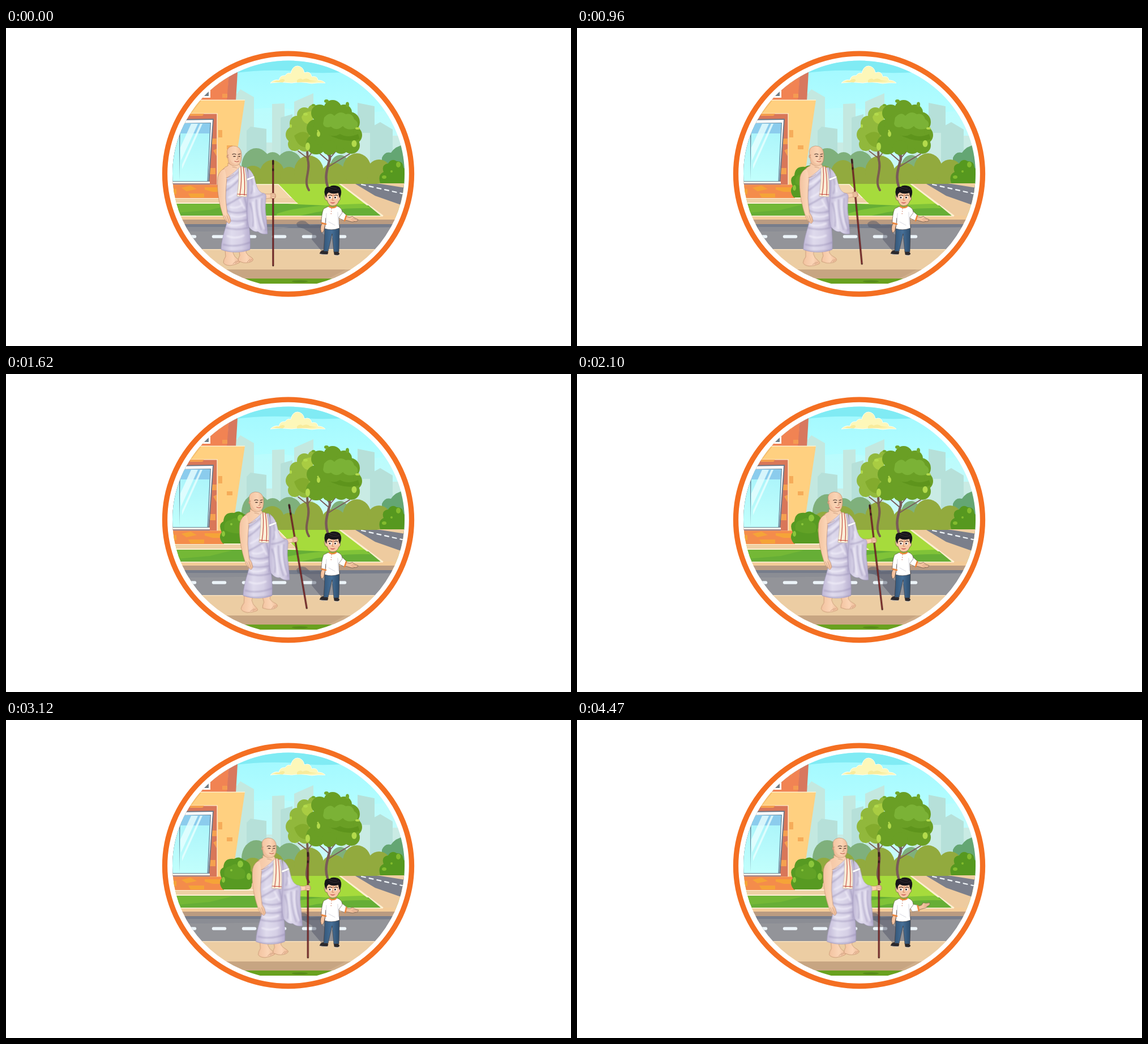
Animation of 998 by 561 pixels, one loop 4.5 s. Source, as an HTML page:

```html
<!DOCTYPE html>
<html lang="en">
<head>
<meta charset="utf-8">
<title>Walk and greet</title>
<style>
html, body { margin: 0; width: 100%; height: 100%; overflow: hidden; background: #fff; }
svg { display: block; width: 100vw; height: 100vh; }
.skin { fill: url(#skin); stroke: #a87352; stroke-width: .5; stroke-linejoin: round; }
.line { fill: none; stroke-linecap: round; stroke-linejoin: round; }
.fold { fill: none; stroke-linecap: round; filter: url(#soft); }
.boy { stroke: #3b2a22; stroke-width: .5; stroke-linejoin: round; }
</style>
</head>
<body>
<svg viewBox="0 0 998 561" preserveAspectRatio="none">
<defs>
  <clipPath id="view"><path d="M294 257.500A205 200 0 0 1 704 257.500A205 200 0 0 1 549 451H449A205 200 0 0 1 294 257.500Z"/></clipPath>
  <linearGradient id="sky" x2="0" y2="1">
    <stop offset="0" stop-color="#a0f8ff"/><stop offset=".4" stop-color="#b2fdff"/><stop offset="1" stop-color="#dcf8f4"/>
  </linearGradient>
  <linearGradient id="glass" x2="0" y2="1"><stop offset="0" stop-color="#a8f3fa"/><stop offset="1" stop-color="#c2fffc"/></linearGradient>
  <linearGradient id="skin"><stop offset="0" stop-color="#f3c3a0"/><stop offset=".6" stop-color="#fbd5b6"/><stop offset="1" stop-color="#f0bd99"/></linearGradient>
  <linearGradient id="robe"><stop offset="0" stop-color="#c0b8d6"/><stop offset=".35" stop-color="#dfdbed"/><stop offset=".7" stop-color="#d6d0e6"/><stop offset="1" stop-color="#b6adcf"/></linearGradient>
  <linearGradient id="jeans"><stop offset="0" stop-color="#34577a"/><stop offset=".5" stop-color="#466f97"/><stop offset="1" stop-color="#2c4c6c"/></linearGradient>
  <filter id="soft" x="-30%" y="-30%" width="160%" height="160%"><feGaussianBlur stdDeviation="1.2"/></filter>
  <clipPath id="robeClip"><path id="robeShape" d="M411 247C403 256 393 262 383 270C388 286 384 300 387 314C393 328 392 340 386 358C382 372 380 382 380 391C396 397 416 397 431 391C432 372 430 354 428 336C433 310 434 276 425 246Z"/></clipPath>
</defs>

<g clip-path="url(#view)">
  <!-- sky and skyline -->
  <path fill="url(#sky)" d="M280 50H720V290H280Z"/>
  <path fill="#80ebf4" d="M330 50H660V72Q560 84 515 76Q455 72 400 80L340 90Z"/>
  <path fill="#c3fbfc" opacity=".5" d="M400 155Q450 132 520 146T720 140V250H400Z"/>
  <path fill="#fdf7b9" stroke="#fffdf0" stroke-width="1" d="M467 97Q474 90 482 92Q484 83 493 84Q497 78 503 80Q506 67 515 67Q525 68 527 79Q538 75 540 86Q550 84 551 92Q559 92 564 97Q550 96 540 98Q520 94 505 97Q485 94 467 97Z"/>
  <path fill="#f8eb9c" d="M473 95Q478 92 482 93Q487 88 492 91Q493 94 489 96ZM514 92Q520 87 524 91Q532 87 537 92L550 94L514 96Z"/>
  <g fill="#b6e0d9">
    <path fill="#c3e8e0" d="M406 118L414 108L438 122V260H402ZM470 134L492 133V250H470ZM509 130L543 115V230H509ZM599 150L608 146V230H590Z"/>
    <path d="M425 181L432 174L460 178V250H425ZM485 158L506 152V230H485ZM621 132L651 138V235H621ZM643 176L661 166L683 179V240H643Z"/>
    <path fill="#c9ebe4" d="M460 202H470V250H460ZM683 190H704V250H683ZM600 185H643V240H600Z"/>
  </g>

  <!-- background bushes -->
  <g fill="#7fb07c">
    <ellipse cx="442" cy="244" rx="26" ry="32"/><ellipse cx="471" cy="246" rx="20" ry="27"/>
    <ellipse cx="500" cy="245" rx="24" ry="28"/><ellipse cx="590" cy="248" rx="18" ry="24"/>
    <path fill="#64a673" d="M664 275V229Q669 217 680 220Q688 208 706 205V275Z"/>
  </g>
  <g fill="#92aa3e">
    <path d="M420 254H700V277H420Z"/>
    <ellipse cx="436" cy="259" rx="18" ry="16"/><ellipse cx="470" cy="258" rx="22" ry="25"/><ellipse cx="500" cy="261" rx="16" ry="16"/>
    <ellipse cx="535" cy="253" rx="26" ry="28"/><ellipse cx="579" cy="259" rx="22" ry="21"/>
    <ellipse cx="620" cy="249" rx="25" ry="28"/><ellipse cx="659" cy="256" rx="22" ry="24"/>
  </g>
  <path fill="#56981f" d="M661 274Q656 259 667 254Q662 241 675 239Q681 229 690 235Q701 234 702 246L709 254V275Z"/>
  <g fill="#83bc2e"><ellipse cx="693" cy="241" rx="4" ry="5"/><ellipse cx="668" cy="263" rx="4" ry="3"/><circle cx="681" cy="253" r="2"/></g>

  <!-- lawn, side street, paths -->
  <path fill="#a6db3c" d="M290 275H710V335H290Z"/>
  <path fill="#eecb9f" d="M590 275H710V348H665L661 331Z"/>
  <path fill="#fff0d0" d="M588 275H592L667 331H661Z"/>
  <path fill="#7b7f8b" d="M617 275H712V317L652 296Z"/>
  <path fill="#f0cfa2" d="M655 274H712V283Z"/>
  <path class="line" stroke="#f2f7fa" stroke-width="2.200" stroke-dasharray="7 7" stroke-linecap="butt" d="M628 276L704 293"/>
  <path fill="#f3d5aa" stroke="#fff3dc" stroke-width="1.500" d="M425 276H481L513 309H425Z"/>
  <path fill="#66ae36" d="M290 310H497Q560 314 640 313L663 332H290Z"/>
  <path fill="#80c338" d="M478 328Q520 312 633 310L645 318Q580 316 520 331H478Z"/>
  <path fill="#74b836" d="M290 311H400L360 321L290 327Z"/>
  <path fill="#eed0a4" d="M290 300H505L514 309H290Z"/>
  <path fill="#fff0d4" d="M290 299H440V301H290ZM290 308H514L516 310H290Z"/>

  <!-- trees -->
  <g class="line" stroke="#7a5c4f">
    <path stroke-width="4" d="M535 286C524 268 539 253 533 232L532 216"/>
    <path stroke-width="1.600" d="M533 230L516 217M534 228L545 213"/>
    <path stroke-width="4.500" stroke="#795a59" d="M568 279C562 263 568 246 572 231L571 213"/>
    <path stroke-width="1.800" stroke="#795a59" d="M571 244Q585 235 607 222M571 236L549 217M572 230L588 211M570 226L558 211"/>
  </g>
  <g fill="#91b83c">
    <circle cx="527" cy="153" r="13"/><circle cx="514" cy="168" r="13"/><circle cx="509" cy="188" r="15"/><circle cx="510" cy="205" r="12"/>
    <circle cx="532" cy="185" r="21"/><circle cx="528" cy="204" r="14"/><circle cx="543" cy="145" r="10"/>
    <path fill="#a9cc42" d="M522 157Q527 146 541 147Q546 160 538 170Q524 169 522 157Z"/>
    <path fill="#83ab2d" d="M509 190Q523 178 535 187L534 210Q516 213 509 190Z"/>
  </g>
  <g fill="#6a9f25">
    <circle cx="577" cy="143" r="16"/><circle cx="597" cy="149" r="14"/><circle cx="554" cy="150" r="15"/><circle cx="607" cy="166" r="18"/>
    <circle cx="613" cy="189" r="16"/><circle cx="547" cy="177" r="16"/><circle cx="548" cy="205" r="18"/><circle cx="578" cy="182" r="36"/>
    <circle cx="592" cy="208" r="14"/><circle cx="610" cy="207" r="15"/><circle cx="571" cy="211" r="13"/>
  </g>
  <path fill="#7bb236" d="M562 158Q572 146 580 155Q590 145 600 152Q612 149 615 161Q625 167 619 177Q602 182 595 173Q584 183 574 174Q563 178 560 169Z"/>
  <path fill="#5e941c" d="M567 187Q579 194 590 187Q604 195 622 187L625 196Q600 205 567 187Z"/>
  <g fill="#b3da4c">
    <ellipse cx="615" cy="204" rx="4.500" ry="6"/><ellipse cx="533" cy="209" rx="4" ry="7"/><ellipse cx="552" cy="187" rx="3" ry="5"/>
    <ellipse cx="621" cy="177" rx="4" ry="2"/><ellipse cx="529" cy="152" rx="4" ry="2.500"/><ellipse cx="503" cy="173" rx="2" ry="3"/><circle cx="551" cy="181" r="1.500"/>
    <g fill="#71a92b"><ellipse cx="603" cy="135" rx="3" ry="4.500"/><ellipse cx="543" cy="136" rx="3" ry="2"/><ellipse cx="566" cy="129" rx="4" ry="3"/></g>
  </g>

  <!-- house -->
  <path fill="#f18353" d="M330 78H394L391 128H330Z"/>
  <path fill="#d8785e" d="M394 78H409L406 128H390Z"/>
  <path fill="#f59b51" d="M364 94L380 88V97L364 101ZM382 116H391V123H382Z"/>
  <path fill="#fff" d="M340 112L361 106V123H335Z"/><path fill="#6f7e88" d="M345 114L358 110V120H341Z"/>
  <path fill="#ffd080" d="M285 127H422L399 282L372 300H285Z"/>
  <path fill="#fff0c9" d="M285 126.500H422V128H285Z"/>
  <path fill="#f5be6f" d="M285 128H345L327 151H285Z"/>
  <path fill="#d97759" stroke="#fff4df" stroke-width="1.200" d="M285 151H373V277H285Z"/>
  <path fill="#f5a04f" d="M325 151H350L347 155H325ZM364 195H372V205H364ZM360 247H370V258H360ZM366 216L372 213V226Z"/>
  <path fill="#f6ac59" d="M375 180H382V193H375ZM390 207H400V214H390Z"/>
  <path fill="#6e7888" d="M286 161L367 160L359 275H286Z"/>
  <path fill="#fff" d="M286 163L365 162L357 273H286Z"/>
  <path fill="#66869a" d="M286 168L362 167L357 271H286Z"/>
  <path fill="url(#glass)" d="M308 168L360.500 168L355.500 270H306ZM286 170L306 169V270H286Z"/>
  <path fill="#86c6ec" opacity=".85" d="M308 168L360.500 168L359.500 186H307Z"/>
  <path fill="#eaffff" opacity=".8" d="M327 169H339L309 234L308 211ZM343 169H347L311 249V241Z"/>
  <path fill="#fff6e9" d="M285 271H360V275H285Z"/><path fill="#a0838a" d="M285 274H360V276.500H285Z"/>
  <path fill="#f48c4b" d="M285 276.500H385V300H285Z"/>
  <path fill="#f5a438" d="M310 282L326 278L337 284L319 288ZM322 292H350V299H326ZM351 281H383V289H365L351 285ZM285 284H301V293H285Z"/>
  <path fill="#579a22" d="M383 299Q374 288 381 279Q374 265 384 260Q385 243 403 245Q411 239 420 247Q434 251 432 266Q444 277 434 289Q435 299 425 299Z"/>
  <path fill="#62a226" d="M386 275Q383 259 397 258Q407 249 416 262Q426 265 421 279Q405 285 386 275Z"/>
  <g fill="#8bc63b"><ellipse cx="414" cy="254" rx="5" ry="6"/><ellipse cx="384" cy="282" rx="3" ry="5"/><ellipse cx="429" cy="276" rx="4" ry="6"/><circle cx="398" cy="265" r="2"/></g>

  <!-- main road -->
  <path fill="#f3cb98" d="M280 331H720V339H280Z"/>
  <path fill="#fff0d5" d="M280 331H666V332.500H280Z"/>
  <path fill="#ba9b81" d="M280 338H720V346H280Z"/>
  <path fill="#939499" d="M280 346H720V391H280Z"/>
  <path fill="#777d8b" d="M280 346H720V351L520 353L280 351Z"/>
  <path fill="#8b8d94" d="M280 351H500L470 357L350 359H280Z"/>
  <path class="line" stroke="#ecf4f9" stroke-width="5.500" stroke-dasharray="20 33" d="M313.500 368H599"/>
  <path fill="#eccda3" d="M280 390H720V427H280Z"/><path fill="#f8e0bd" d="M280 390H720V391.500H280Z"/>
  <path fill="#c7a582" d="M280 426H720V442H280Z"/>
  <path fill="#d0af8b" d="M600 426H720V442H570Z"/>
  <path fill="#69a11f" d="M280 442H720V452H280Z"/><ellipse cx="519" cy="447" rx="14" ry="2" fill="#568b18"/>
  <path fill="#555968" opacity=".5" d="M513 345Q518 338 529 341L537 348L554 347L561 352L556 360L563 365L569 398L557 393L540 373L541 363L526 354L515 351Z"/>
</g>

<!-- monk -->
<g id="monk">
  <g id="backLeg"><path class="skin" d="M386 380L403 382L401 397Q403 404 411 409Q415 412 412 414Q405 418 396 419Q387 419 384 414Q384 409 388 403Z"/>
    <path class="line" stroke="#b57e60" stroke-width=".7" d="M401 416L407 411M405 415L410 411"/></g>
  <g id="frontLeg"><path class="skin" d="M409 380H426L424 396Q426 401 434 405Q438 408 435 411Q430 415 419 414L410 411Q410 406 413 401Z"/>
    <path class="line" stroke="#b57e60" stroke-width=".7" d="M426 413L431 408M430 412L434 408"/></g>
  <path class="skin" d="M392 238Q400 244 412 240L414 244Q426 247 428 261L420 290L385 287L378 263Q380 247 392 243Z"/>
  <g id="farArm"><path class="skin" d="M445 290Q456 294 466 293L472 291Q477 292 476 299L473 302L467 300Q456 303 444 300Z"/></g>
  <g id="staff">
    <path class="line" stroke="#421c1b" stroke-width="3" d="M471.800 235V419"/><path class="line" stroke="#9a2d30" stroke-width="1.200" d="M471.800 236V418"/>
    <path class="line" stroke="#35181a" stroke-width="3" stroke-linecap="butt" d="M471.800 234V240M471.800 249V251"/>
    <path class="skin" d="M468 292Q473 290 476 293L476 299Q473 302 468 300Z"/>
    <path class="line" stroke="#a87352" stroke-width=".6" d="M470 294H475M470 297H475"/>
  </g>
  <use href="#robeShape" fill="url(#robe)" stroke="#9a90b7" stroke-width=".5"/>
  <g clip-path="url(#robeClip)">
    <g class="fold" stroke="#8d83ad" stroke-width="2.200" opacity=".5">
      <path d="M386 271Q396 268 412 253M386 288Q398 282 411 268M388 313Q402 306 416 297M390 322Q407 330 428 322M390 338Q408 344 430 337M387 352Q408 359 431 351M384 382Q405 388 432 378M380 392Q405 397 432 391M421 299Q429 320 426 349"/>
    </g>
    <g class="fold" stroke="#f3f0fa" stroke-width="3" opacity=".7">
      <path d="M390 276Q400 274 410 262M393 299Q405 294 411 287M396 316Q407 319 416 313M397 331Q411 336 423 330M393 347Q406 351 420 345M391 367Q406 373 420 366M413 303L421 318"/>
    </g>
  </g>
  <path fill="url(#robe)" stroke="#9a90b7" stroke-width=".5" d="M427 247Q438 255 441 273Q444 287 452 291Q461 291 459 301Q457 318 460 337L462 363Q452 365 445 359Q437 361 429 351Q424 333 427 302Q430 277 427 247Z"/>
  <g class="fold" stroke="#8d83ad" stroke-width="2" opacity=".5"><path d="M433 263Q438 281 433 292M430 300Q443 299 454 293M431 309Q439 329 436 350M442 303Q442 331 451 356M452 301Q449 326 459 357"/></g>
  <g class="fold" stroke="#f5f2fb" stroke-width="2.500" opacity=".7"><path d="M436 307Q438 330 442 354M448 302Q446 330 456 354M437 278L439 289"/></g>
  <path class="skin" d="M386 248Q377 251 374 263Q372 280 376 303Q379 318 382 327Q384 336 390 342L394 345L397 341Q396 332 391 326Q389 314 388 300Q388 286 390 266"/>
  <path class="line" stroke="#b57e60" stroke-width=".6" d="M386 331L391 342M390 331L394 342M389 264Q397 263 402 258M400 245L408 247"/>
  <path fill="#fbf1da" stroke="#bda797" stroke-width=".6" d="M411 247Q417 241 422 248Q427 271 425 298L408 297Q412 271 411 247Z"/>
  <path class="line" stroke="#c5463b" stroke-width="1.200" d="M415 245Q417 271 413 295M419 245Q423 271 421 295M409 293L425 294"/>
  <path class="line" stroke="#9d98ac" stroke-width="4" d="M427 267L437 263"/><path class="line" stroke="#fff" stroke-width="3.200" d="M427 267L437 263"/>
  <path class="skin" d="M391 223Q388 210 401 208Q415 208 416 222Q417 237 411 241Q404 246 395 240Q392 236 392 230Q388 228 391 223Z"/>
  <path fill="#e9b48f" opacity=".5" d="M391 222Q394 231 399 237Q404 241 411 239Q404 245 396 240Q391 235 391 222Z"/>
  <g class="line" stroke="#463027"><path stroke-width="1.200" d="M400 223Q403 221 406 223M410 223L414 222"/><path stroke-width="1.500" d="M402 226.500H405M411 226.500H413"/>
    <path stroke="#a76a4d" stroke-width=".7" d="M409 226L410 231L407 232M393 224Q390 223 392 229"/><path stroke="#bd584d" stroke-width="1.200" d="M404 235Q408 237 411 235"/></g>
</g>

<!-- boy -->
<g>
  <path class="boy" fill="#2b292d" d="M556 394Q563 390 569 395L568 399Q560 401 554 398ZM579 394Q586 392 589 398Q588 402 580 400Z"/>
  <path class="line" stroke="#ddd" stroke-width=".8" d="M555 399L567 400M580 401L588 401.500"/>
  <path class="boy" fill="url(#jeans)" d="M563 348H589Q589 369 588 395H579L576 363L569 394H561Q563 371 563 348Z"/>
  <path class="boy" fill="#f6c4a0" d="M558 345L564 346L562 355Q561 361 557 361Q555 356 556 350Z"/>
  <g id="boyArm"><path class="boy" fill="#f6c4a0" d="M596 331L607 334L612 332L615 335L622 338L620 341L611 342L604 340L595 338Z"/>
    <path class="line" stroke="#ad775c" stroke-width=".5" d="M612 336L620 339M610 338L617 341"/>
    <path class="boy" fill="#fff" d="M588 317Q594 324 601 330L598 340L587 335Z"/><path class="line" stroke="#ec843a" stroke-width="2.500" d="M601 331L598 340"/></g>
  <path class="boy" fill="#fff" d="M569 315Q576 319 584 314Q594 317 594 326L588 334L589 353Q576 358 563 354L565 335L564 346L557 344Q557 329 561 319Z"/>
  <path class="line" stroke="#d8d8df" stroke-width="1" d="M566 327L565 350M586 325L587 347M570 342L581 348"/>
  <path class="line" stroke="#ec843a" stroke-width="2.500" d="M558 344L565 346M571 315Q577 319 583 315"/>
  <path class="line" stroke="#c86f55" stroke-width="1.400" d="M575 319L574 330" stroke-dasharray=".2 4"/>
  <path class="boy" fill="#f8c7a4" d="M566 294Q561 292 563 300Q564 305 567 304Q570 314 577 314Q585 314 588 305Q592 303 590 297Q589 294 588 295L587 286H567Z"/>
  <path fill="#17151a" d="M566 300Q561 291 563 286Q563 279 572 280Q575 277 582 278Q591 279 592 287Q593 294 589 300L587 291Q577 294 570 290L567 293Z"/>
  <path class="line" stroke="#40343c" stroke-width=".8" d="M570 283Q578 289 589 285M572 281L584 283"/>
  <ellipse cx="572.500" cy="299" rx="3" ry="2.500" fill="#fff"/><ellipse cx="582" cy="299" rx="2.600" ry="2.500" fill="#fff"/>
  <circle cx="572" cy="299" r="1.600" fill="#3b2423"/><circle cx="581.500" cy="299" r="1.600" fill="#3b2423"/>
  <path class="line" stroke="#2b2020" stroke-width="1" d="M569 295.500Q573 293.500 576 295.500M580 295.500Q583 293.500 586 295.500"/>
  <path class="line" stroke="#c27455" stroke-width=".8" d="M577 300L576 304L579 304"/><path fill="#c4464c" d="M572 307Q577 309 582 307Q577 312 572 307Z"/>
  <path class="line" stroke="#d6543c" stroke-width="1" d="M578 294V296"/>
</g>

<ellipse cx="498.500" cy="257.300" rx="218" ry="212.200" fill="none" stroke="#f46f22" stroke-width="9.300"/>
</svg>

<script>
const LOOP = 4500, STEP = 600;

// Play a table of [time, transform] steps around a fixed pivot.
function play(id, origin, steps) {
  const el = document.getElementById(id);
  el.style.transformOrigin = origin;
  el.animate(steps.map(([t, transform]) => ({ offset: t / LOOP, transform })),
    { duration: LOOP, iterations: Infinity });
}

// Two out-and-back swings, then rest.
function swing(id, origin, angle, drop) {
  const pose = k => `translate(0px, ${drop * k}px) rotate(${angle * k}deg)`;
  play(id, origin, [0, 1, 0, 1, 0].map((k, i) => [i * STEP, pose(k)]).concat([[LOOP, pose(0)]]));
}

const slide = x => `translate(${x}px, 0px)`;
play('monk', '0 0', [[0, slide(0)], [280, slide(0)], [2400, slide(61.5)], [LOOP, slide(61.5)]]);
swing('staff', '471.8px 297px', -13.8, -6);
swing('farArm', '442px 296px', -11, 0);
swing('backLeg', '392px 350px', 10, 2.5);
swing('frontLeg', '418px 340px', -5, 2);

const turn = a => `rotate(${a}deg)`;
play('boyArm', '595px 328px', [[0, turn(0)], [2880, turn(0)], [4320, turn(-32)], [LOOP, turn(-32)]]);
</script>
</body>
</html>
```
